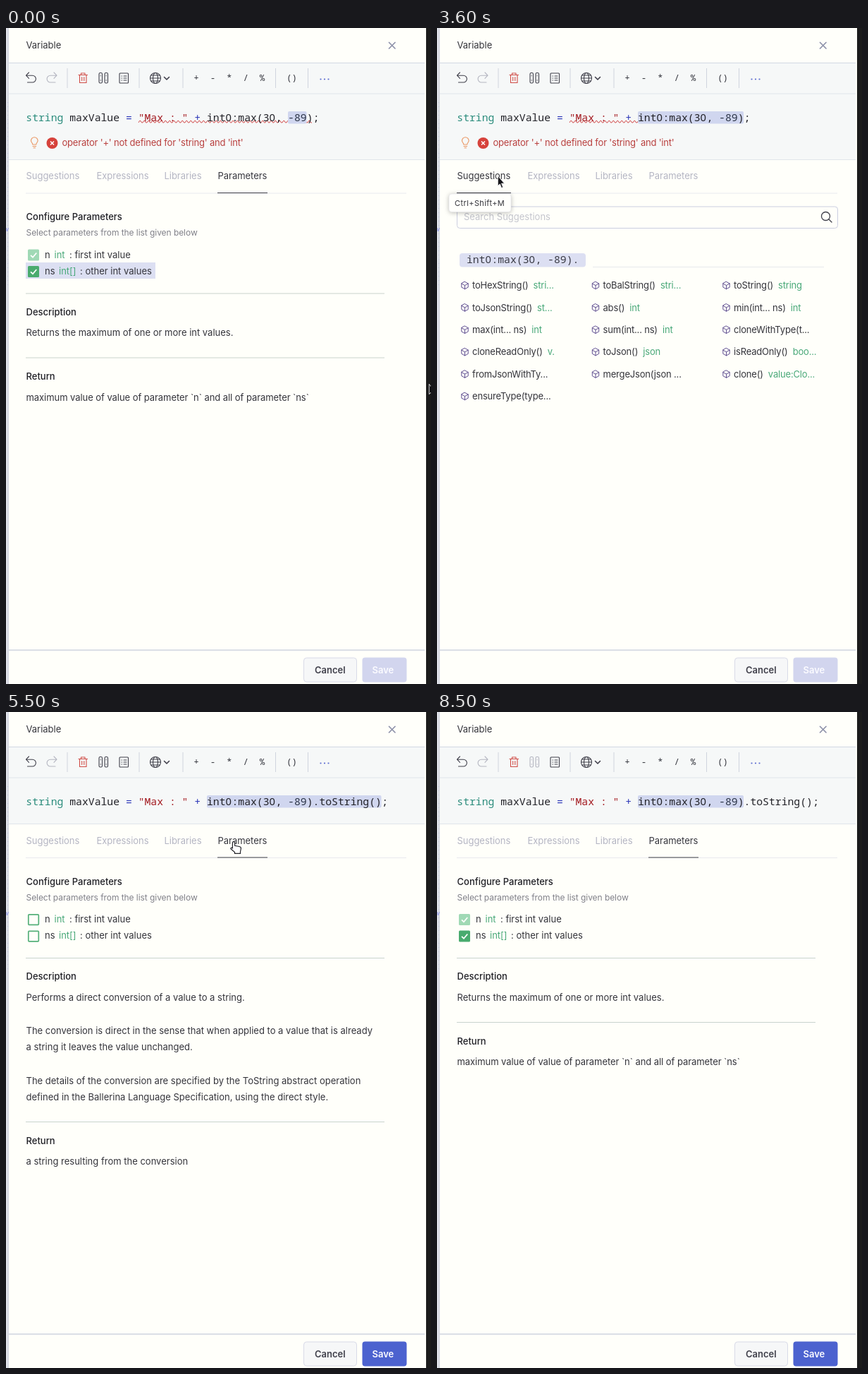
Write an HTML page that moves like this. It is 603 px wide and 929 px high and loops after 9400 ms.

```html
<!DOCTYPE html>
<html lang="en">
<head>
<meta charset="utf-8">
<title>Variable editor</title>
<style>
html, body { margin: 0; width: 100%; height: 100%; overflow: hidden; background: #fffffa; }
svg { display: block; }
text { font: 13px Inter, sans-serif; fill: #34343b; white-space: pre; }
.head { font-weight: 500; fill: #1f1f25; }
.button { font-weight: 600; }
.note { font-size: 12px; letter-spacing: -.06px; fill: #808089; }
.error { letter-spacing: -.2px; fill: #b9403f; }
.type { fill: #48a878; }
.code { font: 14.75px "Noto Sans Mono", monospace; fill: #222228; }
.zero { font-family: "Noto Sans", sans-serif; letter-spacing: .41px; }
.sign { font: 12.5px "Noto Sans Mono", monospace; text-anchor: middle; fill: #33343c; }
.item { letter-spacing: -.18px; }
.tab { letter-spacing: -.03px; fill: #b4b5c3; }
.tab.on { fill: #37373f; }
.icon { fill: none; stroke: #40404b; stroke-width: 1.1; stroke-linejoin: round; stroke-linecap: round; }
.rule { fill: none; stroke: #c9d3ce; stroke-width: 1.2; }
.tip { fill: #fffffc; stroke: #e4e4ea; stroke-width: .6; filter: drop-shadow(0 1px 3px #0004); }
.off { display: none; }
</style>
</head>
<body>
<svg width="603" height="929" viewBox="0 0 603 929">
  <defs>
    <linearGradient id="edge"><stop stop-color="#e4e6ee"/><stop offset="1" stop-color="#d3d5de"/></linearGradient>
    <path id="cube" class="icon" style="stroke:#604f91;stroke-width:1" d="M0-5.2 4.7-2.6V2.6L0 5.2-4.7 2.6V-2.6ZM-4.7-2.6 0 0 4.7-2.6M0 0V5.2"/>
    <path id="tick" fill="none" stroke="#fff" stroke-width="1.7" d="M4 8.3 7 11.2 12.3 5"/>
  </defs>

  <rect width="603" height="929" fill="#fffffa"/>
  <rect width="4" height="929" fill="url(#edge)"/>
  <path d="M2.5 105V365" stroke="#c3c8de" stroke-dasharray="1 5"/>
  <path d="M0 283 1.5 288 3.5 283" fill="none" stroke="#8f97e8"/>
  <rect x="596" width="7" height="929" fill="#1c1c1c"/>

  <text x="28.5" y="28.5">Variable</text>
  <path class="icon" style="stroke:#8e92aa;stroke-width:1.7" d="M543.5 20.5 552 29M552 20.5 543.5 29"/>

  <!-- Toolbar and expression editor -->
  <rect id="editor" x="4" y="49" width="590" height="137" fill="#f6f8f8"/>
  <path stroke="#d2d8e3" d="M4 49.5H594"/>
  <path stroke="#e0e5ea" d="M4 93H594"/>
  <path id="editorEnd" stroke="#e0e5ea"/>
  <path stroke="#d0d4de" d="M87 57V85M189 57V85M251 57V85M382.5 57V85M428.5 57V85"/>
  <path class="icon" d="M32.5 63 28.5 67.2 32.5 71.4M28.5 67.2H37.5A4.9 4.9 0 0 1 37.5 77H30.5"/>
  <path class="icon" style="stroke:#b4b5c0" d="M68 63 72 67.2 68 71.4M72 67.2H63A4.9 4.9 0 0 0 63 77H70"/>
  <path class="icon" style="stroke:#cf4b45" d="M103 66.5H115.500M106.5 66.5V64H112V66.5M104.5 66.5V77.5H114V66.5M107.7 69.5V74.5M110.8 69.5V74.5"/>
  <g id="columns" class="icon">
    <rect x="132" y="63.5" width="4.5" height="14.5" rx="1.8"/><rect x="140" y="63.5" width="4.5" height="14.5" rx="1.8"/>
    <path stroke-width=".8" d="M134.200 67V68M134.200 73.500V74.500M142.200 67V68M142.200 73.500V74.500"/>
  </g>
  <g class="icon"><rect x="161" y="64" width="12.5" height="14" rx="1"/><path d="M164 68H164.5M167 68H171M164 71H164.5M167 71H171M164 74H164.5M167 74H171"/></g>
  <g class="icon"><circle cx="212" cy="71" r="7.5"/><ellipse cx="212" cy="71" rx="3.5" ry="7.5"/><path d="M204.5 71H219.5M205.5 67H218.5M205.5 75H218.5"/><path stroke-width="1.6" d="M224.5 69.5 228 73 231.5 69.5"/></g>
  <g id="signs"></g>
  <g fill="#5a6bd0"><circle cx="446.5" cy="72.5" r="1.1"/><circle cx="452" cy="72.5" r="1.1"/><circle cx="457.5" cy="72.5" r="1.1"/></g>

  <path id="squiggle" fill="none" stroke="#cf3a3a" stroke-width=".9"/>
  <rect id="hover" x="285" y="118" width="150" height="17.5" fill="#e2e9ea"/>
  <rect id="selection" y="118" height="17.5" rx="2" fill="#d0d6ef"/>
  <text class="code" x="28.3" y="131.5"><tspan fill="#2b8c7c">string</tspan> maxValue <tspan fill="#2a35b8">=</tspan> <tspan fill="#a31a20">"Max : "</tspan> <tspan fill="#2a35b8">+</tspan> int<tspan class="zero">0</tspan>:max(3<tspan class="zero">0</tspan>, <tspan fill="#2c3547">-89</tspan>)<tspan id="codeEnd">;</tspan></text>

  <g id="error">
    <path class="icon" style="stroke:#ea9560" d="M37.8 165C37.8 162.5 35.5 162 35.5 159.5A4.8 4.8 0 0 1 45.1 159.5C45.1 162 42.8 162.5 42.8 165ZM38 167.5H42.6M39 169.8H41.6"/>
    <circle cx="65.5" cy="163" r="8" fill="#d6423b"/>
    <path d="M63 160.5 68 165.5M68 160.5 63 165.5" stroke="#fff" stroke-width="1.5"/>
    <text class="error" x="79.5" y="167">operator '+' not defined for 'string' and 'int'</text>
  </g>

  <g id="body">
    <path stroke="#e8e9ee" d="M28 234H568"/>
    <path id="underline" stroke="#40404b" stroke-width="1.2"/>
    <text class="tab" x="28.5" y="214">Suggestions</text>
    <text class="tab" x="128.5" y="214">Expressions</text>
    <text class="tab" x="224.5" y="214">Libraries</text>
    <text class="tab" x="300.5" y="214">Parameters</text>

    <g id="params">
      <text class="head" x="28.5" y="272">Configure Parameters</text>
      <text class="note" x="28.5" y="294">Select parameters from the list given below</text>
      <rect id="rowMark" x="28" y="332" width="184" height="23" fill="#dcdff2"/>
      <g id="checked">
        <g transform="translate(31 313.5)"><rect width="16" height="16" rx="1.5" fill="#a0d9b5"/><use href="#tick"/></g>
        <g transform="translate(31 337)"><rect width="16" height="16" rx="1.5" fill="#49ab6e"/><use href="#tick"/></g>
      </g>
      <g id="unchecked" fill="none" stroke="#55b07a" stroke-width="1.7">
        <rect x="31.8" y="314.3" width="14.5" height="14.5" rx="1"/><rect x="31.8" y="337.8" width="14.5" height="14.5" rx="1"/>
      </g>
      <text y="325.5" x="55">n<tspan class="type" x="68.5">int</tspan><tspan x="90">: first int value</tspan></text>
      <text y="348.5" x="55">ns<tspan class="type" x="75">int[]</tspan><tspan x="105">: other int values</tspan></text>
      <path class="rule" d="M28 376H537"/>
      <text class="head" x="28.5" y="406.5">Description</text>
      <g id="maxDoc">
        <text x="28.5" y="436">Returns the maximum of one or more int values.</text>
        <path class="rule" d="M28 467H537"/>
        <text class="head" x="28.5" y="498">Return</text>
        <text x="28.5" y="527.5" letter-spacing="-.06">maximum value of value of parameter `n` and all of parameter `ns`</text>
      </g>
      <g id="stringDoc">
        <text x="28.5" y="436">Performs a direct conversion of a value to a string.</text>
        <text x="28.5" y="483">The conversion is direct in the sense that when applied to a value that is already</text>
        <text x="28.5" y="506.5">a string it leaves the value unchanged.</text>
        <text x="28.5" y="554">The details of the conversion are specified by the ToString abstract operation</text>
        <text x="28.5" y="577.5">defined in the Ballerina Language Specification, using the direct style.</text>
        <path class="rule" d="M28 608H537"/>
        <text class="head" x="28.5" y="639.5">Return</text>
        <text x="28.5" y="668.5">a string resulting from the conversion</text>
      </g>
    </g>

    <g id="suggestions">
      <rect x="28.5" y="253" width="540" height="30.5" rx="4" fill="none" stroke="#cbcee0"/>
      <text x="38" y="272" style="fill:#c4c5cd">Search Suggestions</text>
      <g class="icon" style="stroke-width:1.3"><circle cx="551.5" cy="266.5" r="6"/><path d="M556 271 560 275"/></g>
      <rect x="32" y="319" width="179" height="19.5" rx="4" fill="#dcdff2"/>
      <text class="code" x="42" y="333" style="fill:#3a3b45">int<tspan class="zero">0</tspan>:max(3<tspan class="zero">0</tspan>, -89).</text>
      <path stroke="#e7e8ec" d="M221 338.5H549"/>
      <rect id="itemMark" x="390" y="353" width="159" height="23.5" fill="#ecedf5"/>
      <g id="items"></g>
      <g id="itemTip">
        <rect class="tip" x="436" y="390.5" width="113" height="32.5" rx="4"/>
        <text x="445" y="411.5" class="item">toString()<tspan class="type" dx="3">string</tspan></text>
      </g>
    </g>
    <g id="keyTip">
      <rect class="tip" x="17" y="235" width="88" height="25.5" rx="4"/>
      <text x="25" y="251.5" style="font-size:11px;letter-spacing:.4px">Ctrl+Shift+M</text>
    </g>
  </g>

  <path stroke="#cfd4df" stroke-width="1.3" d="M4 881H594"/>
  <rect x="422.5" y="892" width="75" height="34" rx="4" fill="#f6f7f8" stroke="#d8dae8"/>
  <text class="button" x="438" y="913.5" style="fill:#40404b">Cancel</text>
  <rect id="save" x="505.5" y="891.5" width="63" height="35" rx="4"/>
  <text class="button" x="519.5" y="913.5" style="fill:#fbfbff">Save</text>

  <path id="arrow" fill="#16161a" stroke="#fff" stroke-width=".8" d="M.3.3V14.6L3.3 11.9 5.5 17.5 7.7 16.5 5.5 11.2H9.6Z"/>
  <path id="hand" fill="#fff" stroke="#25252b" stroke-width="1.2" d="M5 .7C6 .7 6.6 1.4 6.6 2.3V6.3L13 7.5C14.8 7.9 15.6 9 15.4 10.5L14.5 14.8V17.3H6.5V15.5L1.2 11C.2 9.7 1.8 8.5 3.4 9.7V2.3C3.4 1.4 4 .7 5 .7Z"/>
</svg>

<script>
const LOOP = 9400, STEP = 100, LIFT = 27.5;
const $ = id => document.getElementById(id);
const show = (id, on) => $(id).classList.toggle("off", !on);
const set = (id, attrs) => Object.entries(attrs).forEach(([k, v]) => $(id).setAttribute(k, v));

// Pointer stops: time in steps, x, y and shape (a = arrow, h = hand).
const stops = `0 600 504 a,6 560 470 a,7 490 380 a,8 415 265 a,9 345 175 a,10 310 134 a,
12 322 124 h,13 329 122 h,15 344 125 h,16 327 125 h,20 331 126 h,
24 285 140 a,25 220 163 a,26 150 190 a,27 100 205 h,28 82 208 h,33 84 209 h,
36 86 209 a,37 125 270 a,38 190 385 a,39 265 530 a,40 340 623 a,41 385 595 a,42 408 537 a,
44 413 480 a,45 424 415 a,46 437 372 a,47 444 358 a,
52 441 350 a,53 390 270 a,54 335 197 h,55 318 183 h,56 328 160 h,57 327 135 h,58 326 125 h,59 323 125 h,60 327 126 h,
63 348 160 a,64 376 232 a,65 420 380 a,66 458 610 a,67 456 545 a,69 456 545.5 a,71 456 546 a,
81 300 420 a,82 110 220 a,83 2 86 a`.split(",").map(row => row.trim().split(" "));

const items = `toHexString() stri...|toBalString() stri...|toString() string|toJsonString() st...|abs() int|min(int...\u00a0ns) int|
max(int...\u00a0ns) int|sum(int...\u00a0ns) int|cloneWithType(t...|cloneReadOnly() v.|toJson() json|isReadOnly() boo...|
fromJsonWithTy...|mergeJson(json\u00a0...|clone() value:Clo...|ensureType(type...`.split("|");

$("items").innerHTML = items.map((item, i) => {
  const [name, type = ""] = item.replace("\n", "").split(" ");
  const x = 39.5 + i % 3 * 185.5, y = 364.5 + Math.floor(i / 3) * 31.4;
  return `<use href="#cube" x="${x}" y="${y}"/>
    <text class="item" x="${x + 10.5}" y="${y + 4.7}">${name}<tspan class="type" dx="7">${type}</tspan></text>`;
}).join("");

$("signs").innerHTML = ["+", "-", "*", "/", "%"]
  .map((sign, i) => `<text class="sign" x="${270 + i * 23.4}" y="75">${sign}</text>`).join("")
  + `<text class="sign" x="405.5" y="75">()</text>`;

set("squiggle", { d: "M188 134" + "l1.5-2.5 1.5 0 1.5 2.5 1.5 0".repeat(41) });

const tabs = [...document.querySelectorAll(".tab")];

function draw(t) {
  const whole = t >= 1800, fixed = t >= 5200, reselected = t >= 6300;
  const listing = t >= 2900 && t < 5500;
  const converting = t >= 5500 && !reselected;

  show("error", !fixed);
  show("squiggle", !fixed);
  set("editor", { height: fixed ? 109.5 : 137 });
  set("editorEnd", { d: `M4 ${fixed ? 158.5 : 186.5}H594` });
  set("body", { transform: `translate(0 ${fixed ? -LIFT : 0})` });
  $("codeEnd").textContent = fixed ? ".toString();" : ";";
  set("save", { fill: fixed ? "#4c62cf" : "#d2d5ee" });
  $("columns").style.stroke = reselected ? "#b4b5c0" : "";

  show("hover", t >= 1200 && !whole);
  set("selection", {
    x: whole ? 285 : 400,
    width: !whole ? 26.5 : fixed && !reselected ? 247.5 : 150
  });

  show("params", !listing);
  show("suggestions", listing);
  show("rowMark", !whole);
  show("checked", !converting);
  show("unchecked", converting);
  show("maxDoc", !converting);
  show("stringDoc", converting);
  tabs.forEach((tab, i) => tab.classList.toggle("on", i === (listing ? 0 : 3)));
  set("underline", { d: listing ? "M28 233.5H105" : "M300 233.5H371" });
  show("keyTip", t >= 3200 && t < 3800);
  show("itemMark", t >= 4600 && t < 5200);
  show("itemTip", t >= 4700 && t < 5200);

  const [, x, y, shape] = stops.findLast(([at]) => at * STEP <= t);
  const pointer = t < 8500;
  show("arrow", pointer && shape === "a");
  show("hand", pointer && shape === "h");
  set(shape === "a" ? "arrow" : "hand", { transform: `translate(${x} ${y})` });
}

const start = performance.now();
function tick() {
  draw((performance.now() - start) % LOOP);
  requestAnimationFrame(tick);
}
tick();
</script>
</body>
</html>
```
